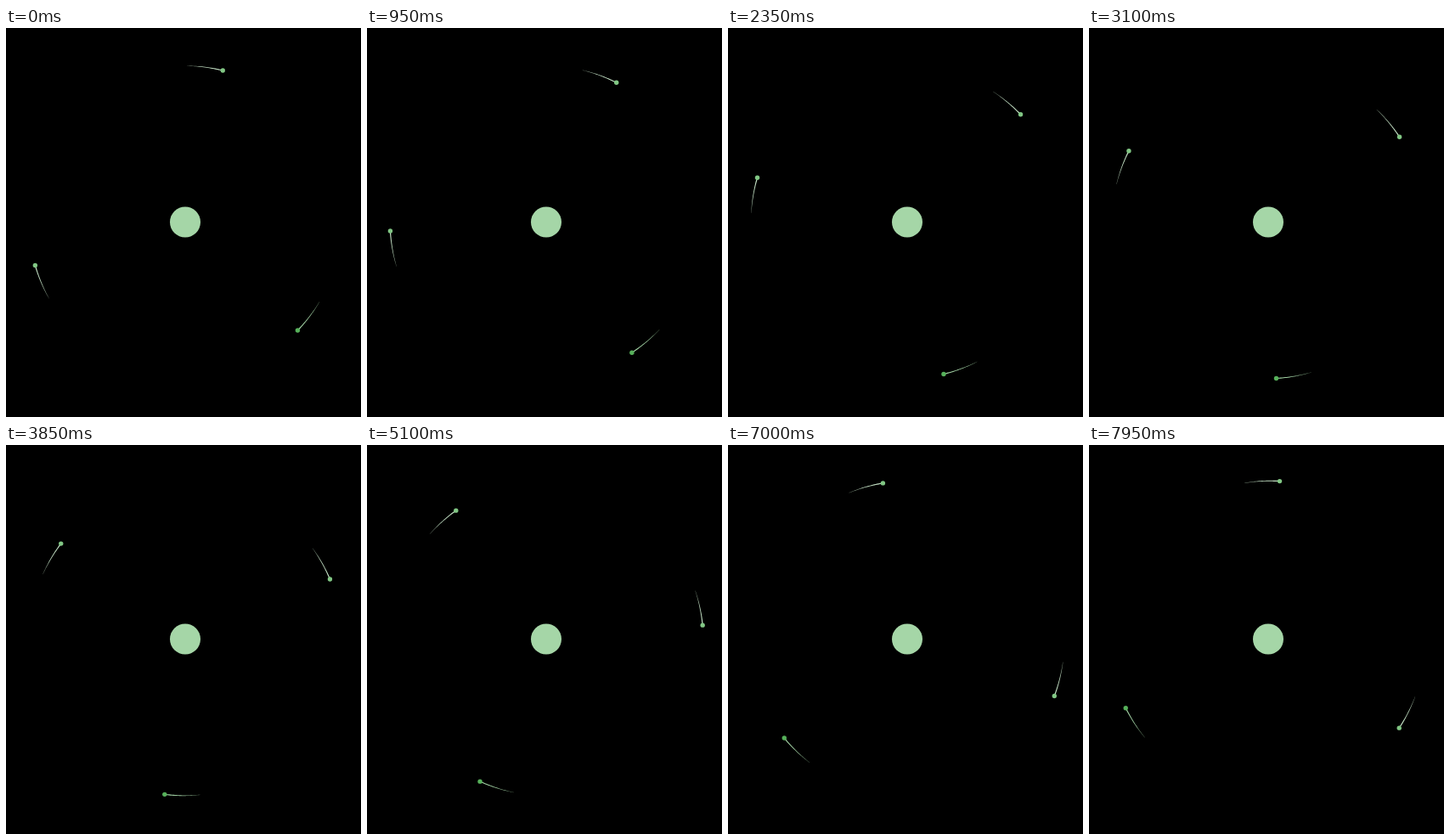
An HTML page with a canvas that plays this animation: 418x458 px, repeating every 8000 ms.

```html
<!DOCTYPE html>
<html lang="en">
<head>
<meta charset="utf-8">
<title>Orbit</title>
<style>
  html, body { margin: 0; width: 100%; height: 100%; overflow: hidden; background: #000; }
  canvas { display: block; width: 418px; height: 458px; }
</style>
</head>
<body>
<canvas id="stage"></canvas>
<script>
const WIDTH = 418, HEIGHT = 458, LOOP = 8000, STEP = 50;
const CENTER = { x: 211, y: 228.5 };
const TAIL_SECONDS = 0.93, TAIL_POINTS = 24;
const SATELLITES = [
  { phase: -120, color: '#81c784', tail: '200,230,201' },
  { phase: 0, color: '#56b05a', tail: '165,214,167' },
  { phase: 120, color: '#81c784', tail: '200,230,201' }
];

const canvas = document.getElementById('stage');
const ctx = canvas.getContext('2d');
const ratio = window.devicePixelRatio || 1;
canvas.width = WIDTH * ratio;
canvas.height = HEIGHT * ratio;
ctx.scale(ratio, ratio);

// The orbit slowly widens, and the angular speed drops with it.
function orbitPoint(seconds, phase, offset = 0) {
  const s = Math.max(0, seconds);
  const degrees = 43.93 + phase + 14.25 * seconds - 0.0376 * s * s;
  const angle = degrees * Math.PI / 180;
  const radius = 183.85 + 0.041 * s * s + offset;
  return {
    x: CENTER.x + radius * Math.cos(angle),
    y: CENTER.y + radius * Math.sin(angle)
  };
}

function disc({ x, y }, radius, color) {
  ctx.fillStyle = color;
  ctx.beginPath();
  ctx.arc(x, y, radius, 0, 2 * Math.PI);
  ctx.fill();
}

function drawTail(seconds, { phase, tail }) {
  const head = orbitPoint(seconds, phase);
  const end = orbitPoint(seconds - TAIL_SECONDS, phase);
  const fade = ctx.createLinearGradient(end.x, end.y, head.x, head.y);
  fade.addColorStop(0, `rgba(${tail},0.5)`);
  fade.addColorStop(0.4, `rgba(${tail},0.9)`);
  fade.addColorStop(1, `rgb(${tail})`);
  ctx.fillStyle = fade;
  ctx.beginPath();
  for (const side of [1, -1]) {
    for (let i = 0; i <= TAIL_POINTS; i++) {
      const k = (side > 0 ? i : TAIL_POINTS - i) / TAIL_POINTS;
      const halfWidth = 0.15 + 0.5 * k;
      const p = orbitPoint(seconds - TAIL_SECONDS * (1 - k), phase, side * halfWidth);
      ctx.lineTo(p.x, p.y);
    }
  }
  ctx.fill();
}

function draw(time) {
  const tick = Math.floor((time % LOOP) / STEP);
  const seconds = Math.max(0, tick - 1) * STEP / 1000;
  ctx.fillStyle = '#000';
  ctx.fillRect(0, 0, WIDTH, HEIGHT);
  disc(CENTER, 18, '#a5d6a7');
  for (const satellite of SATELLITES) {
    drawTail(seconds, satellite);
    disc(orbitPoint(seconds, satellite.phase), 2.7, satellite.color);
  }
}

let start;
function frame(now) {
  start ??= now;
  draw(now - start);
  requestAnimationFrame(frame);
}
draw(0);
requestAnimationFrame(frame);
</script>
</body>
</html>
```
